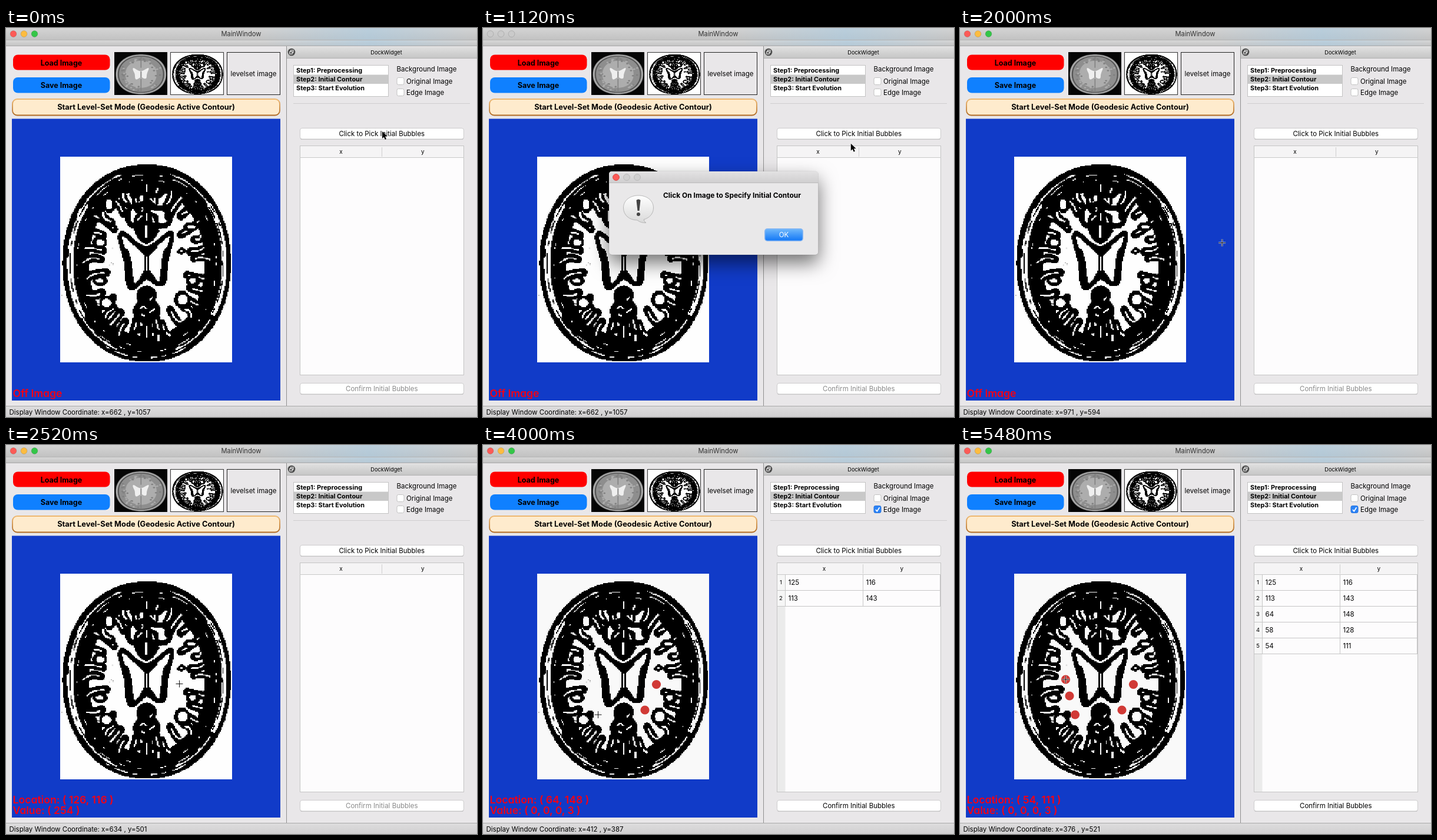
Write an HTML page with a canvas that moves like this. It is 800 px wide and 662 px high and loops after 5.52 s.

```html
<!DOCTYPE html>
<html lang="en">
<head>
<meta charset="utf-8">
<title>MainWindow</title>
<style>
  html, body { margin: 0; width: 100%; height: 100%; overflow: hidden; background: #e9e7e9; }
  svg, canvas { position: absolute; left: 0; top: 0; }
  canvas { image-rendering: pixelated; }
  text { font-family: Inter, Roboto, sans-serif; white-space: pre; }
  .view { font-feature-settings: "cv11"; }
  .shadow { filter: drop-shadow(0 14px 16px rgba(0, 0, 0, .55)); }
</style>
</head>
<body>
<svg id="base" width="800" height="662"></svg>
<canvas id="scan" width="180" height="216" style="left:92px;top:219px;width:292px;height:350px"></canvas>
<canvas id="grey" width="90" height="73" style="left:184px;top:41px"></canvas>
<canvas id="edge" width="88" height="71" style="left:281px;top:42px"></canvas>
<svg id="live" width="800" height="662"></svg>
<script>
const LOOP = 5520;
const el = id => document.getElementById(id);

// SVG helpers; text is placed by the middle of its capitals
const rect = (x, y, w, h, fill, more = '') =>
  `<rect x="${x}" y="${y}" width="${w}" height="${h}" fill="${fill}" ${more}/>`;
const disc = (x, y, r, fill, more = '') => `<circle cx="${x}" cy="${y}" r="${r}" fill="${fill}" ${more}/>`;
const line = (d, color, w = 1, more = '') =>
  `<path d="${d}" fill="none" stroke="${color}" stroke-width="${w}" ${more}/>`;
const text = (s, x, y, size = 11.5, more = '') =>
  `<text x="${x}" y="${y + size * .363}" font-size="${size}" ${more}>${s}</text>`;
const MID = 'text-anchor="middle"', BOLD = 'font-weight="700"';
const grad = (id, ...stops) => `<linearGradient id="${id}" x2="0" y2="1">` +
  stops.map((c, i) => `<stop offset="${i / (stops.length - 1)}" stop-color="${c}"/>`).join('') + '</linearGradient>';
const button = (s, y, color = '#000') =>
  rect(499.5, y + 1, 278, 19, '#bdbdbd', 'rx="3.5"') +
  rect(499.5, y + .5, 278, 18.5, '#fff', 'rx="3.5" stroke="#cdcccd"') +
  text(s, 638.3, y + 9.7, 11.5, `${MID} fill="${color}"`);

el('base').innerHTML = '<defs>' +
  grad('bar', '#d4d4d4', '#c2c2c2') + grad('frameBar', '#e3e2e3', '#cfcecf') +
  grad('strip', '#d9d9d9', '#c2c2c2') + grad('dock', '#e0e0e0', '#c6c6c6') +
  grad('status', '#dedddE', '#d0cfd0') + grad('frame', '#eeb871', '#b06a22') +
  grad('ok', '#6db6fb', '#1579f6') + grad('okDown', '#3f86ef', '#0a52d6') +
  grad('bubble', '#ffffff', '#d9d9d9') +
  '<linearGradient id="tint"><stop offset="0" stop-color="#a9cbe2" stop-opacity="0"/>' +
  '<stop offset=".5" stop-color="#a9cbe2" stop-opacity=".6"/>' +
  '<stop offset="1" stop-color="#a9cbe2" stop-opacity="0"/></linearGradient></defs>' +
  rect(0, 0, 800, 662, '#e9e7e9') +
  rect(12, 45.5, 164.5, 26, '#ff0000', 'rx="8"') +
  text('Load Image', 94, 59, 12.5, MID + ' ' + BOLD) +
  rect(12, 84, 164.5, 26.5, '#0f80ff', 'rx="8"') +
  text('Save Image', 94, 97.7, 12.5, MID + ' ' + BOLD) +
  rect(279.5, 41.5, 90, 72, '#fff', 'stroke="#333"') +
  rect(375.5, 41.5, 90, 72, '#e9e7e9', 'stroke="#222"') +
  text('levelset image', 420.5, 78, 11.5, MID) +
  rect(11, 121, 454, 27.5, '#feebcd', 'rx="8" stroke="url(#frame)" stroke-width="1.8"') +
  text('Start Level-Set Mode (Geodesic Active Contour)', 238, 134.8, 12.85, MID + ' ' + BOLD) +
  rect(10, 154.5, 456, 479.5, '#113bc8') +
  line('M476.5 31V643', '#8f8f8f') +
  rect(477, 32, 323, 19, 'url(#dock)') + line('M477 51.5H800', '#b2b2b2') +
  text('DockWidget', 646, 42, 9.2, MID) +
  disc(485, 41, 6.3, '#4b4b4b') +
  rect(483.6, 37.8, 4.4, 4, 'none', 'stroke="#fff"') + rect(481.8, 40.2, 4.4, 4, '#4b4b4b', 'stroke="#fff"') +
  rect(488.5, 63.5, 161, 53, '#fff', 'stroke="#c3c3c3"') + rect(489, 79.5, 160.5, 15.5, '#c8c8c8') +
  ['Step1: Preprocessing', 'Step2: Initial Contour', 'Step3: Start Evolution']
    .map((s, i) => text(s, 493, 71.7 + 15.3 * i, 10.9, BOLD)).join('') +
  text('Background Image', 663.5, 70.2) +
  text('Original Image', 680, 90.8) + text('Edge Image', 680, 109.8) +
  line('M488 128.5H788', '#cfcecf') +
  button('Click to Pick Initial Bubbles', 170) +
  rect(0, 643, 800, 19, 'url(#status)') + line('M0 643.5H800', '#a9a9a9');

// Brain section, drawn on a coarse grid in stage coordinates
let seed = 11;
const rnd = (a = 0, b = 1) => {
  seed = (seed * 16807) % 2147483647;
  return a + (b - a) * seed / 2147483647;
};
const TAU = Math.PI * 2;
const at = (rx, ry, a) => {
  const bend = v => Math.sign(v) * Math.abs(v) ** .94;
  return [239 + rx * bend(Math.cos(a)), 400 + ry * bend(Math.sin(a))];
};
function oval(rx, ry, a0 = 0, a1 = TAU) {
  const p = new Path2D();
  for (let i = 0; i <= 80; i++) p.lineTo(...at(rx, ry, a0 + (a1 - a0) * i / 80));
  return p;
}
function pen(canvas) {
  const g = canvas.getContext('2d', { willReadFrequently: true });
  const sx = canvas.width / 292, sy = canvas.height / 350;
  g.setTransform(sx, 0, 0, sy, -92 * sx, -219 * sy);
  g.lineCap = g.lineJoin = 'round';
  const api = {
    g,
    fill(p, color) { g.fillStyle = color; g.fill(typeof p === 'string' ? new Path2D(p) : p); },
    stroke(p, w, color, dash = []) {
      g.setLineDash(dash); g.lineWidth = w; g.strokeStyle = color;
      g.stroke(typeof p === 'string' ? new Path2D(p) : p); g.setLineDash([]);
    },
    blob(x, y, rx, ry, color) {
      const p = new Path2D(); p.ellipse(x, y, rx, ry, 0, 0, TAU); api.fill(p, color);
    }
  };
  return api;
}
const WINGS = 'M197 349C207 350 214 370 238 376C258 370 268 352 280 349C286 354 277 372 273 392' +
  'C268 412 273 424 267 434C256 442 250 426 239 424C228 428 222 444 211 442C203 432 208 412 203 392C198 374 189 354 197 349Z';

function drawScan() {
  const { g, fill, stroke, blob } = pen(el('scan'));
  const W = '#fff', B = '#000';
  g.fillStyle = W; g.fillRect(92, 219, 292, 350);
  fill(oval(143, 168), B);
  // scalp: from, to, width, inset
  [[2.55, 3.8, 10, 13], [-.65, .55, 8, 11], [1.95, 2.5, 4, 12], [.65, 1.2, 4, 12],
   [3.85, 4.4, 3, 11], [5, 5.65, 3, 11]].forEach(([a, b, w, d]) => stroke(oval(143 - d, 168 - d, a, b), w, W));
  stroke(oval(130, 155), 2, B, [22, 9, 36, 12, 8, 14]);
  stroke(oval(134, 158, 3.2, 5.9), 1.8, B, [12, 20, 40, 16]);
  stroke(oval(136, 161, 1.1, 2.1), 1.8, W, [24, 10, 7, 9]);
  stroke(oval(129, 151, 1, 2.2), 1.6, W, [22, 22, 9, 18]);
  stroke(oval(127, 150, 4, 5.3), 1.6, W, [26, 19, 6, 19]);
  stroke(oval(118, 142), 1.6, W, [4, 26, 9, 42, 2, 19]);
  fill(oval(98, 124), W);

  // folds of the cortex
  const folds = 32;
  for (let i = 0; i < folds; i++) {
    const a = (i + rnd(-.2, .2)) / folds * TAU;
    const tip = (i % 2 ? .7 : .8) + rnd(-.04, .05), turn = rnd(-.1, .1);
    const strand = (from, to) => {
      const p = new Path2D();
      p.moveTo(...at(106 * from, 132 * from, a));
      p.quadraticCurveTo(...at(94, 120, a + turn), ...at(100 * to, 136 * to, a + turn * .5));
      return p;
    };
    stroke(strand(1, tip), rnd(12, 16), B);
    stroke(strand(rnd(.9, 1.03), tip + .03), rnd(2.2, 3.4), W);
  }
  // larger pockets: x, y, rx, ry
  [[172, 468, 14, 13], [299, 462, 14, 15], [176, 300, 11, 15], [159, 365, 13, 11], [160, 430, 13, 9],
   [314, 338, 13, 8], [318, 430, 12, 10]].forEach(([x, y, rx, ry], i) => {
    blob(x, y, rx, ry, B);
    blob(x + (i % 2 ? 1 : -1), y, rx - 6, ry - 6, W);
  });

  // frontal midline
  stroke('M239 256V318', 13, B);
  stroke('M239 280C228 276 224 290 214 284M239 290C250 276 256 292 266 280', 9, B);
  stroke('M239 266V278M233 291L226 296M246 291L252 296', 2, W);
  stroke('M234 298C222 306 206 296 207 322C207 340 220 338 228 330M245 298C254 312 262 302 272 310C286 324 278 340 258 336', 9, B);
  fill('M218 320Q239 302 259 320L260 346Q250 366 238 368Q222 362 216 340Z', B);
  stroke('M224 326L230 320M248 322L251 330M239 316V326M238 336V356', 2, W);

  // ventricles
  fill(WINGS, W);
  stroke(WINGS, 8, B);
  stroke('M203 380C211 396 208 414 213 434M274 378C265 396 271 414 265 430', 10, B);
  stroke('M224 371L239 386L254 371M239 382V424M239 412L228 432M239 412L252 430', 8, B);
  stroke('M239 390V412', 1.8, W);

  // rear midline
  fill('M239 438C254 440 260 452 254 464C266 474 266 492 250 500L239 508L228 500C212 492 212 476 224 466C218 452 224 440 239 438Z', B);
  stroke('M239 496V556', 16, B);
  stroke('M239 512C226 508 222 522 212 520M239 514C252 508 258 524 268 518M239 530L222 538M239 530L258 538', 9, B);
  stroke('M228 478Q234 470 238 478M245 462L249 458M244 484L252 478M239 508V526M230 488L236 490', 2.2, W);

  stroke('M292 381L298 375L304 379L298 383Z', 5, B);
  fill('M296 378L301 378L298 381Z', W);

  // hard two-tone pixels
  const im = g.getImageData(0, 0, 180, 216);
  for (let i = 0; i < im.data.length; i += 4) im.data.fill(im.data[i] > 127 ? 254 : 0, i, i + 3);
  g.putImageData(im, 0, 0);
  g.fillStyle = '#888';
  [[178, 399], [181, 401], [175, 403], [94, 454], [180, 374]].forEach(([x, y]) => g.fillRect(x, y, 1.6, 1.6));
}

function drawThumbs() {
  el('edge').getContext('2d').drawImage(el('scan'), 0, 0, 88, 71);
  const { g, fill, stroke, blob } = pen(el('grey'));
  g.fillStyle = '#050505'; g.fillRect(92, 219, 292, 350);
  fill(oval(140, 164), '#555');
  stroke(oval(133, 156), 9, '#aaa');
  fill(oval(121, 144), '#8e8e8e');
  fill(oval(86, 110), '#adadad');
  for (let i = 0; i < 60; i++) {
    const [x, y] = at(rnd(70, 115), rnd(90, 138), rnd(0, TAU));
    blob(x, y, 6, 6, i % 2 ? '#808080' : '#acacac');
  }
  stroke('M239 265V345M239 440V535', 5, '#808080');
  fill(WINGS, '#efefef');
  stroke('M239 380V425', 8, '#9a9a9a');
}

// t, pointer x y, window x y, pixel x y
const PATH = [
  [0, 639, 176, 1107, 632, 257, 80],
  [480, 639, 176, 1107, 632, 257, 80],
  [640, 641, 176, 1107, 632, 257, 80],
  [1000, 641, 176, 1107, 632, 257, 80],
  [1560, 506, 349, 1107, 632, 257, 80],
  [1760, 506, 349, 1107, 632, 257, 80],
  [2440, 294.5, 406.5, 634, 501, 126, 116],
  [2760, 294.5, 406.5, 634, 501, 125, 116],
  [3320, 275, 451, 588, 407, 113, 142],
  [3400, 275, 451, 588, 407, 113, 142],
  [3560, 275, 451, 588, 405, 113, 143],
  [3960, 195.5, 459, 412, 387, 64, 148],
  [4200, 195.5, 459, 412, 387, 64, 148],
  [4560, 186, 427, 391, 458, 58, 128],
  [4760, 186, 427, 391, 458, 58, 128],
  [5120, 179.5, 399, 376, 521, 54, 111],
  [LOOP, 179.5, 399, 376, 521, 54, 111]
];
// t, stage x y, pixel x y
const PICKS = [
  [2680, 294.5, 407.5, 125, 116], [3440, 275, 451, 113, 143], [4120, 195.5, 459, 64, 148],
  [4680, 186, 427, 58, 128], [5240, 179.5, 399, 54, 111]
];
const OPEN = 700, PRESS = 1640, CLOSE = 1750;

function pose(t) {
  const i = PATH.findIndex(k => k[0] > t), a = PATH[i - 1], b = PATH[i];
  const p = (t - a[0]) / (b[0] - a[0]), e = p * p * (3 - 2 * p);
  return a.map((v, k) => v + (b[k] - v) * e).slice(1);
}

function titleBar(active) {
  const lights = active ? ['#fc5b57', '#fdbc40', '#34c648'] : Array(3).fill('#cacaca');
  return rect(0, 0, 800, 20, 'url(#bar)') + rect(430, 0, 370, 20, 'url(#tint)') +
    rect(0, 20, 800, 11, 'url(#strip)') + rect(440, 20, 360, 11, 'url(#tint)') +
    line('M0 20.5H800', '#b4b4b4') + line('M0 30.5H800', '#a8a8a8') +
    lights.map((c, i) => disc(12.5 + 18 * i, 10, 5.4, c, 'stroke="#0002"')).join('') +
    text('MainWindow', 399.5, 10.2, 11.2, `${MID} fill="#333"`);
}

function checkbox(y, on) {
  return rect(664, y, 12, 12, on ? '#2b83f6' : '#fff', `rx="2.5" stroke="${on ? '#2873dc' : '#c2c2c2'}"`) +
    (on ? line(`M667 ${y + 6.5}l2.3 2.8l4.2 -6.5`, '#fff', 1.7) : '');
}

function table(rows) {
  const n = rows.length, left = n ? (n > 1 ? 513.5 : 511.5) : 499.5;
  const split = n ? (n > 1 ? 645.5 : 644.5) : 638.5;
  let s = rect(499.5, 200.5, 278, 390, '#fdfcfd', 'stroke="#c4c4c4"') + rect(500, 201, 277, 19, '#f5f4f5') +
    line('M499 220.5H778', '#c9c9c9') + line(`M${split} 203V219`, '#cfcfcf') +
    text('x', (left + split) / 2, 210.5, 10, MID) + text('y', (split + 777) / 2, 210.5, 10, MID);
  if (n) s += rect(500, 221, left - 500, 369, '#ebebeb');
  rows.forEach(([, , , x, y], i) => {
    const top = 220.5 + 27 * i;
    s += rect(500, top + .5, left - 500, 26, '#f6f6f6') +
      line(`M499 ${top + 27}H777M${left} ${top}v27M${split} ${top}v27M776.5 ${top}v27`, '#c6c6c6') +
      text(i + 1, 506, top + 13, 9.5, MID) + text(x, left + 5, top + 13) + text(y, split + 5, top + 13);
  });
  return s;
}

function dialog(t) {
  if (t < OPEN || t >= CLOSE + 60) return '';
  const p = Math.min(1, (t - OPEN) / 220), scale = .5 + .5 * p;
  const alpha = t > CLOSE ? 1 - (t - CLOSE) / 60 : Math.min(1, p * 1.5);
  const down = t >= PRESS;
  return `<g class="shadow" opacity="${alpha}" transform="translate(391.5 315.2) scale(${scale}) translate(-391.5 -315.2)">` +
    rect(214, 244, 355.5, 142, '#e9e8e9', 'rx="5" stroke="#0003" stroke-width=".6"') +
    '<path d="M214 263.5V249q0 -5 5 -5H564.5q5 0 5 5V263.5Z" fill="url(#frameBar)"/>' + line('M214 263.5H569.5', '#bcbcbc') +
    disc(226, 254, 5.4, '#fc5b57', 'stroke="#d9443f"') +
    [244, 262].map(x => disc(x, 254, 5.4, '#d0d0d0', 'stroke="#bababa"')).join('') +
    '<path d="M264 285C279 285 289.500 294 289.500 306C289.500 316 283 323 273 326Q274 330 277 331.500Q268 332 262 327' +
    'C248 327 238.500 318 238.500 306C238.500 294 249 285 264 285Z" fill="url(#bubble)" stroke="#aaa" stroke-width=".8"/>' +
    '<path d="M260.500 293Q264 290 267.500 293L265.500 311H262.500Z" fill="#444"/>' + disc(264, 317, 3, '#444') +
    text('Click On Image to Specify Initial Contour', 306, 285, 11.95, BOLD) +
    rect(478, 341, 66, 22, '#86b6f2', 'rx="5"') +
    rect(479.5, 342.5, 63, 19, down ? 'url(#okDown)' : 'url(#ok)', 'rx="3.5"') +
    text('OK', 511, 352, 11.5, MID + ' fill="#fff"') + '</g>';
}

function pointer(x, y) {
  if (x > 466) return `<path transform="translate(${x} ${y})" d="M0 0V12L2.900 9.400L4.900 14L7 13.100L5 8.600H8.800Z" ` +
    'fill="#000" stroke="#fff" stroke-width="1" paint-order="stroke" stroke-linejoin="round"/>';
  const cross = `M${x - 6} ${y}h12M${x} ${y - 6}v12`;
  return line(cross, '#fff', 2.6, 'opacity=".75"') + line(cross, '#111', 1);
}

function scene(t) {
  const [x, y, ...where] = pose(t);
  const [wx, wy, px, py] = where.map(Math.round);
  const rows = PICKS.filter(p => t >= p[0]), on = rows.length > 0;
  const inside = x <= 384;
  const note = (s, cy) => text(s, 11.5, cy, 17.6, 'class="view" fill="#f50014" font-weight="600"');
  return titleBar(t < OPEN || t >= CLOSE) +
    checkbox(84.5, false) + checkbox(103.5, on) + table(rows) +
    button('Confirm Initial Bubbles', 604, on ? '#000' : '#8a8a8a') +
    (on ? rect(92, 219, 292, 350, '#000', 'opacity=".02"') : '') +
    rows.map(p => disc(p[1], p[2], 7.6, '#d13a36')).join('') +
    (inside
      ? note(`Location: ( ${px}, ${py} )`, 603.5) + note(`Value: ( ${on ? '0, 0, 0, 3' : '254'} )`, 622)
      : note('Off Image', 622)) +
    text('Display Window Coordinate: ' + (x > 466 ? 'x=662 , y=1057' : `x=${wx} , y=${wy}`), 5.5, 653.7) +
    dialog(t) + pointer(x, y);
}

drawScan();
drawThumbs();
const start = performance.now();
function tick() {
  el('live').innerHTML = scene((performance.now() - start) % LOOP);
  requestAnimationFrame(tick);
}
tick();
</script>
</body>
</html>
```
